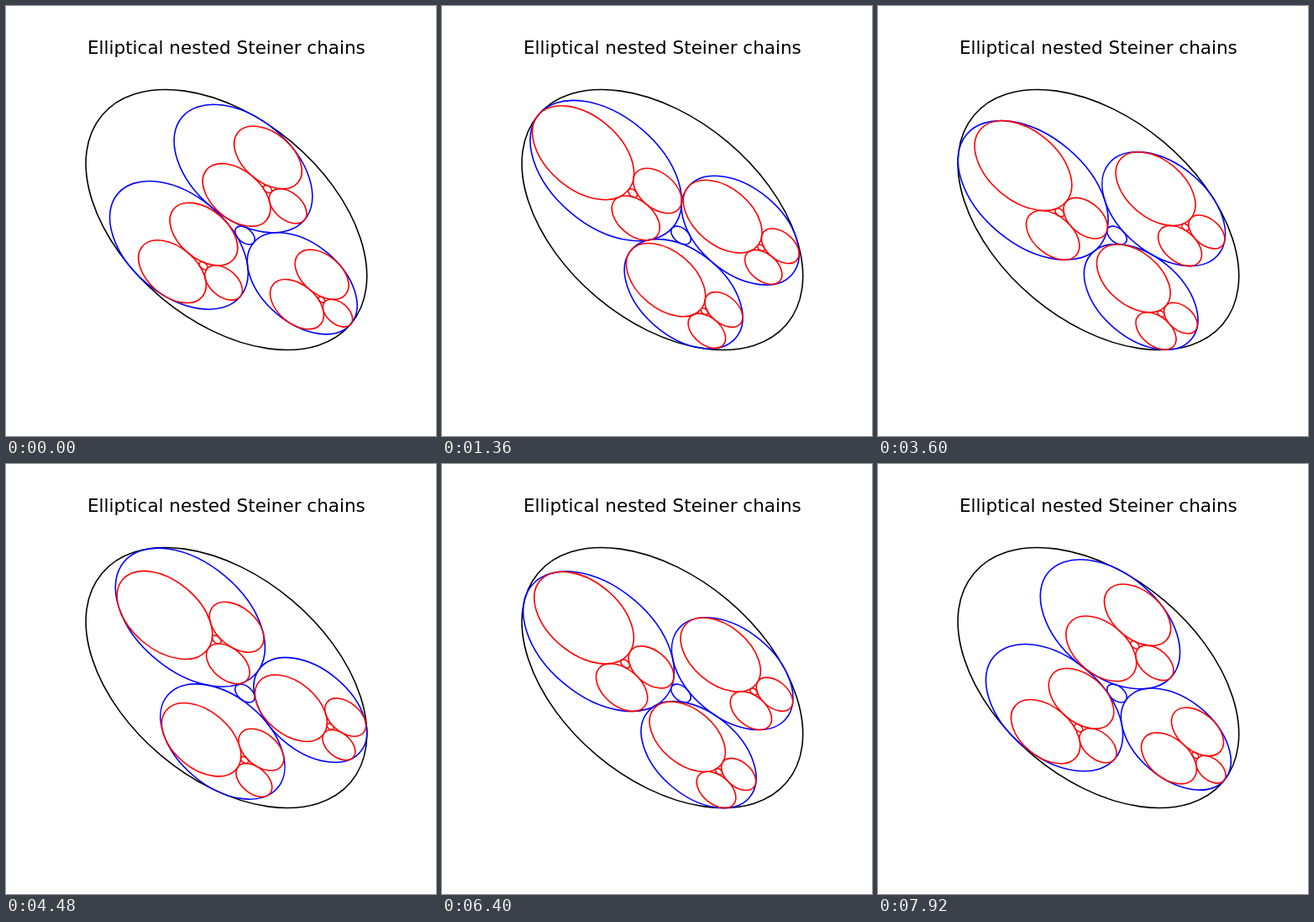
Recreate the animation shown at these times as an HTML page with a canvas. Size 512 px wide and 512 px high, loop 8 s.

```html
<!DOCTYPE html>
<html lang="en">
<head>
<meta charset="utf-8">
<title>Elliptical nested Steiner chains</title>
<style>
  html, body { margin: 0; width: 100%; height: 100%; overflow: hidden; background: #fff; }
  canvas { display: block; width: 512px; height: 512px; }
</style>
</head>
<body>
<canvas id="stage" width="512" height="512"></canvas>
<script>
const ctx = document.getElementById('stage').getContext('2d');

const STEP_MS = 80, STEPS = 100;
const CENTER = { x: 262.4, y: 254.5 };
const SEMI = { major: 193.4, minor: 120.9 };
const TILT = 40 * Math.PI / 180;
const LINKS = 3;
const UNIT = { x: 0, y: 0, r: 1 };

// Concentric Steiner chain inside the unit circle
const sine = Math.sin(Math.PI / LINKS);
const LINK_R = sine / (1 + sine);
const LINK_D = 1 / (1 + sine);
const CORE_R = (1 - sine) / (1 + sine);

// Image of a circle under z -> (z + c) / (1 + cz)
function mobius({ x, y, r }, c) {
  const k = (1 + c * x) ** 2 + c * c * (y * y - r * r);
  return {
    x: ((x + c) * (1 + c * x) + c * (y * y - r * r)) / k,
    y: y * (1 - c * c) / k,
    r: r * (1 - c * c) / k
  };
}

function chain(parent, c, phase) {
  const place = circle => {
    const m = mobius(circle, c);
    return { x: parent.x + parent.r * m.x, y: parent.y + parent.r * m.y, r: parent.r * m.r };
  };
  const links = Array.from({ length: LINKS }, (_, i) => {
    const a = phase + i * 2 * Math.PI / LINKS;
    return place({ x: LINK_D * Math.cos(a), y: LINK_D * Math.sin(a), r: LINK_R });
  });
  return { links, core: place({ x: 0, y: 0, r: CORE_R }) };
}

// Maps a circle of the unit disc to a tilted ellipse on the stage
function outline({ x, y, r }, color) {
  const u = x * SEMI.major, v = y * SEMI.minor;
  const cos = Math.cos(TILT), sin = Math.sin(TILT);
  ctx.strokeStyle = color;
  ctx.beginPath();
  ctx.ellipse(CENTER.x + u * cos - v * sin, CENTER.y + u * sin + v * cos,
    r * SEMI.major, r * SEMI.minor, TILT, 0, 2 * Math.PI);
  ctx.stroke();
}

function outlineChain({ links, core }, color) {
  [...links, core].forEach(circle => outline(circle, color));
}

function draw(phase) {
  ctx.fillStyle = '#fff';
  ctx.fillRect(0, 0, 512, 512);

  ctx.fillStyle = '#000';
  ctx.font = '21.5px "DejaVu Sans", sans-serif';
  ctx.textAlign = 'center';
  ctx.fillText('Elliptical nested Steiner chains', CENTER.x, 56.5);

  ctx.lineWidth = 1.6;
  outline(UNIT, '#000');
  const outer = chain(UNIT, 0.15, phase);
  outlineChain(outer, '#00f');
  outer.links.forEach(link => outlineChain(chain(link, 0.4, -phase), '#f00'));
}

function tick() {
  const step = Math.floor(performance.now() / STEP_MS) % STEPS;
  draw(step / STEPS * 2 * Math.PI);
  requestAnimationFrame(tick);
}
tick();
</script>
</body>
</html>
```
